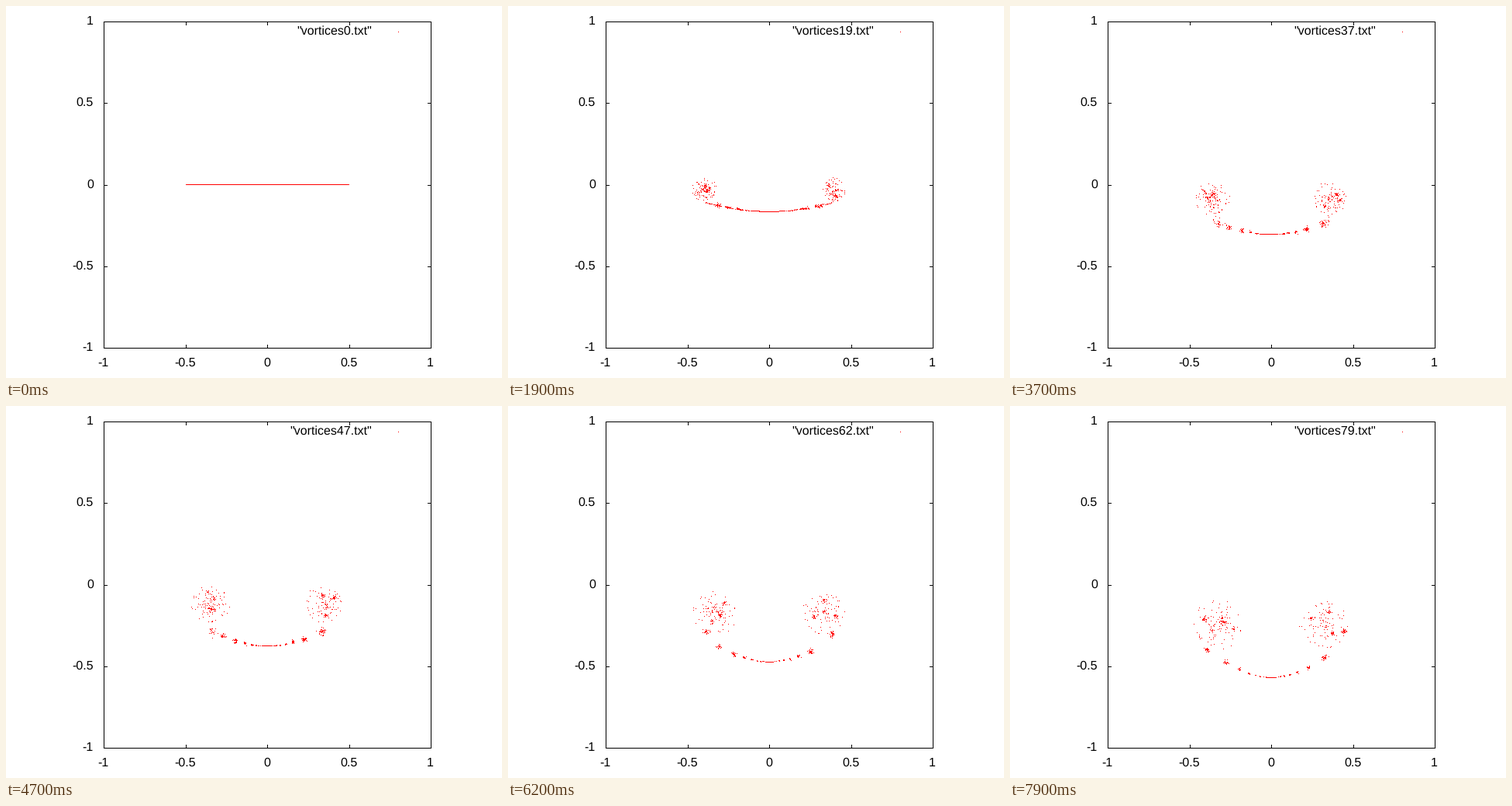
Animation of 640 by 480 pixels, one loop 8 s. Source, as a matplotlib script:

```python
import numpy as np
import matplotlib.pyplot as plt
from matplotlib.animation import FuncAnimation
from matplotlib.patches import Rectangle

W, H, DPI = 640, 480, 100
FRAMES = 80
LAST = FRAMES - 1
MID, ZERO = 337.3, 230.3     # screen position of the plot's origin
HALF = 105                   # half span of the wing
TIP = 66                     # innermost clump that is drawn into the tip vortex
FEED = 72                    # everything inside this stays on the sheet for long

plt.rcParams["font.family"] = "Liberation Sans"
plt.rcParams["font.size"] = 16 * 72 / DPI
plt.rcParams["text.hinting"] = "none"


def ease(u):
    u = np.clip(u, 0, 1)
    return u * u * (3 - 2 * u)


def core(t):
    """Centre of the tip vortex: outward distance + 1j * height on screen."""
    return 67 + 33 * np.exp(-t / 28) + 1j * (ZERO + t * t / (34 + 1.09 * t))


class Wing:
    """One half of the vortex sheet; knots are clump offsets at the end."""

    def __init__(self, sign, outer, knots, seed, n=300):
        rng = np.random.default_rng(seed)
        self.sign = sign
        self.s = s = HALF * np.sin(np.linspace(0, np.pi / 2, n))
        self.size = np.abs(rng.normal(size=n))
        self.phase = rng.uniform(0, 2 * np.pi, n)
        self.pull = 1 - 0.3 * rng.random(n) ** 3

        # sheet clumps get closer towards the middle
        clumps = np.append(outer / 1.42 ** np.arange(7), TIP)
        self.near = clumps[np.abs(s[:, None] - clumps).argmin(axis=1)]
        self.tip = self.near == TIP
        feed = self.tip & (s < FEED)
        self.clumping = self.pull * (s < FEED)
        self.enter = 58 * ((HALF - np.where(feed, TIP, s)) / 40) ** 2.35

        # around the tip: about half in knots, the rest loose
        group = np.where(feed, 0, rng.integers(1, 2 * len(knots), n))
        loose = group >= len(knots)
        cloud = 30 * rng.uniform(0.1, 1.1, n) * np.exp(1j * self.phase)
        self.home = np.where(loose, cloud, np.take(knots, group, mode="clip"))
        self.knot = np.where(loose, 0, 1.7 * self.size)
        self.rate = 28 / (np.abs(self.home) ** 2 + 20)

    def spin(self, radius, t):
        return radius * np.exp(1j * (self.phase - 0.8 * t / (1 + radius / 2)))

    def sheet(self, t):
        s = self.s
        onset = 378 / np.maximum(s, 1)
        pairs = 0.75 * ease((t - 0.7 * onset) / 8)
        clump = self.clumping * ease((t - onset) / 28)
        x = s + pairs * (2 * np.round(s / 2) - s)
        x += clump * (self.near - x)
        x *= 1 + 0.55 * (t / LAST) ** 4
        y = ZERO + 1.95 * t - 0.00545 * t * t
        y = y - t / (5094 + 33.5 * t) * x ** 1.85
        wobble = clump * 0.04 * self.near + 0.5 * pairs * (s > 25)
        return x + 1j * y + self.spin(wobble * self.size, t)

    def rolled(self, t):
        turn = np.exp(1j * self.rate * (LAST - t))
        return (core(t) + self.home * np.sqrt(t / LAST) * turn
                + self.spin(self.knot, t))

    def pixels(self, t):
        mix = self.tip * ease((t - self.enter) / (6 + 0.15 * self.enter))
        z = (1 - mix) * self.sheet(t) + mix * self.rolled(t)
        x = np.floor(MID + self.sign * z.real).astype(int)
        return np.floor(z.imag).astype(int), x


wings = [Wing(-1, 53.5, [18 - 7j, 7 + 7j, -5 - 10j, -20 + 5j, -7 - 4j], 4),
         Wing(1, 44, [25 + 9j, 1 + 3j, 5 - 17j, -18 - 9j, 10 + 11j], 9)]

fig = plt.figure(figsize=(W / DPI, H / DPI), dpi=DPI, facecolor="white")
ax = fig.add_axes([0, 0, 1, 1])
canvas = np.full((H, W, 3), 255, np.uint8)
dots = ax.imshow(canvas, extent=(0, W, H, 0), aspect="auto",
                 interpolation="nearest", zorder=0)
ax.set_xlim(0, W)
ax.set_ylim(H, 0)
ax.axis("off")


def bar(x, y, w, h, color="black"):
    ax.add_patch(Rectangle((x, y), w, h, fc=color, lw=0, zorder=2))


L, R, T, B = 126, 548, 20, 441
for y in (T, B):
    bar(L, y, R - L + 1, 1)
for x in (L, R):
    bar(x, T, 1, B - T + 1)

for k, name in enumerate(["-1", "-0.5", "0", "0.5", "1"]):
    x = int(L + (R - L) * k / 4 + 0.5)
    y = int(B - (B - T) * k / 4 + 0.5)
    bar(x, T, 1, 5)
    bar(x, B - 4, 1, 5)
    bar(L, y, 5, 1)
    bar(R - 4, y, 5, 1)
    ax.text(x - 0.5, 465, name, ha="center", va="baseline")
    ax.text(113, y + 4, name, ha="right", va="baseline")

bar(506, 33, 1, 1, "red")
title = ax.text(472, 37, "", ha="right", va="baseline")


def draw(i):
    canvas[:] = 255
    for wing in wings:
        canvas[wing.pixels(i)] = (255, 0, 0)
    dots.set_data(canvas)
    title.set_text(f'"vortices{i}.txt"')
    return dots, title


anim = FuncAnimation(fig, draw, frames=FRAMES, interval=100, repeat=True)
plt.show()
```
